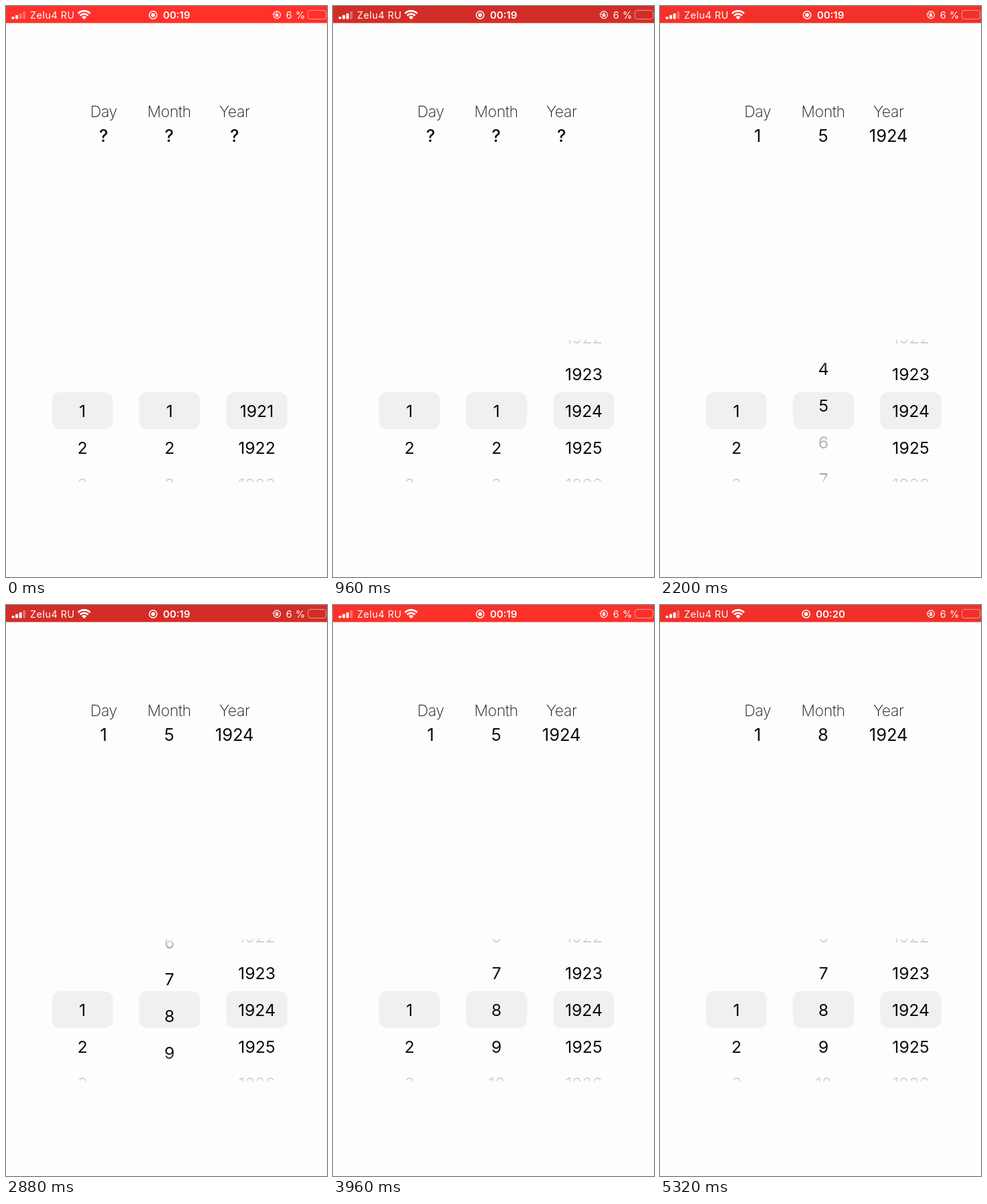
An HTML page for the animation above (5360 ms loop, 480 px wide and 853 px high).

```html
<!DOCTYPE html>
<html lang="en">
<head>
<meta charset="utf-8">
<title>Date wheels</title>
<style>
  html, body { margin: 0; width: 100%; height: 100%; overflow: hidden; background: #fefdfe; }
  svg { display: block; width: 480px; height: 853px; font-family: Inter, "Noto Sans", sans-serif; }
  .mid { text-anchor: middle; }
  .title { font-size: 23px; font-weight: 200; letter-spacing: -.4px; fill: #111; }
  .value { font-size: 25.5px; fill: #0b090c; }
  .row { font-size: 24.8px; fill: #0b090c; }
  .bar { font-size: 14.5px; fill: #fff; }
</style>
</head>
<body>
<svg viewBox="0 0 480 853">
  <defs>
    <linearGradient id="edges" gradientUnits="userSpaceOnUse" x1="0" y1="498" x2="0" y2="712">
      <stop offset="0" stop-color="#fff" stop-opacity=".08"/>
      <stop offset=".21" stop-color="#fff"/>
      <stop offset=".79" stop-color="#fff"/>
      <stop offset="1" stop-color="#fff" stop-opacity=".08"/>
    </linearGradient>
    <mask id="view" maskUnits="userSpaceOnUse" x="0" y="498" width="480" height="214" style="mask-type:alpha">
      <rect y="498" width="480" height="214" fill="url(#edges)"/>
    </mask>
    <clipPath id="fan"><path d="M116.800 20.300L104 7.500V0H129.600V7.500Z"/></clipPath>
  </defs>

  <rect id="status" width="480" height="25.500"/>
  <g id="signal" fill="#fff"></g>
  <text class="bar" x="36" y="18.500" letter-spacing=".45">Zelu4 RU</text>
  <g clip-path="url(#fan)" fill="none" stroke="#fff" stroke-width="2.700">
    <circle cx="116.800" cy="20" r="12.600"/>
    <circle cx="116.800" cy="20" r="8.200"/>
    <circle cx="116.800" cy="20" r="2.500" stroke-width="5"/>
  </g>
  <g id="record">
    <circle cx="220" cy="13.500" r="5.700" fill="none" stroke="#fff" stroke-width="1.500"/>
    <circle cx="220" cy="13.500" r="2.900" fill="#fff"/>
  </g>
  <text id="clock" class="bar mid" x="255" y="18.800" style="font-size:15px;font-weight:600"></text>
  <g fill="none" stroke="#fff" stroke-width="1.200">
    <path d="M400.200 11.300A5.300 5.300 0 1 1 400 14.500M398.700 11.500L400 13.300L402 12"/>
    <path d="M403.900 13V11.800a1.200 1.200 0 0 1 2.400 0V13"/>
    <rect x="402.900" y="12.700" width="4.400" height="3.400" rx=".7" fill="#fff" stroke="none"/>
  </g>
  <text class="bar" x="418.800" y="18.500" letter-spacing=".6">6 %</text>
  <rect x="451.500" y="6.500" width="27" height="13" rx="3.600" fill="none" stroke="#fff" stroke-opacity=".5"/>

  <g id="labels"></g>
  <g id="cards" fill="#f2eff2"></g>
  <g id="wheels" mask="url(#view)"></g>
</svg>
<script>
const LOOP = 5360, ROW = 55, MIDDLE = 605, FADE = 150;
const $ = id => document.getElementById(id);
const clamp = (v, lo, hi) => Math.min(hi, Math.max(lo, v));

function add(parent, tag, attrs, text = '') {
  const el = document.createElementNS('http://www.w3.org/2000/svg', tag);
  for (const key in attrs) el.setAttribute(key, attrs[key]);
  el.textContent = text;
  return parent.appendChild(el);
}

// A swipe is an accelerating drag, then a decaying glide to rest.
function swipe(t, { start, release, from, drag, to, decay }) {
  if (t < release) return from + drag * clamp((t - start) / (release - start), 0, 1) ** 2;
  return to - (to - from - drag) * Math.exp((release - t) / decay);
}

const firstSwipe = { start: 1220, release: 1440, from: 0, drag: 1.9, to: 4, decay: 140 };
const nextSwipe = { start: 2100, release: 2440, from: 4, drag: 1.6, to: 7, decay: 203 };
const monthPos = t => swipe(t, t < nextSwipe.start ? firstSwipe : nextSwipe);

// Dragged a little past a row, then snapped back onto it.
function yearPos(t) {
  const u = clamp((t - 80) / 330, 0, 1);
  if (t < 500) return 3.27 * u * u * (3 - 2 * u);
  return 3 + .27 * Math.exp(-(((t - 500) / 150) ** 2));
}

const columns = [
  { title: 'Day', labelX: 146, x: 114.3, first: 1, count: 31, pos: () => 0,
    values: [[0, '?'], [1100, '1']] },
  { title: 'Month', labelX: 244, x: 244.5, first: 1, count: 12, pos: monthPos,
    press: { row: 5, down: 2060, up: 2250 },
    values: [[0, '?'], [1100, '1'], [2060, '5'], [4200, '8']] },
  { title: 'Year', labelX: 341.7, x: 375, first: 1921, count: 12, pos: yearPos,
    values: [[0, '?'], [1100, '1924']] }
];

for (const c of columns) {
  add($('labels'), 'text', { class: 'title mid', x: c.labelX, y: 166 }, c.title);
  c.value = add($('labels'), 'text', { class: 'value mid', x: c.labelX, y: 202.5 });
  add($('cards'), 'rect', { x: c.x - 45.6, y: 577, width: 91.3, height: 55, rx: 12 });
  c.rows = Array.from({ length: c.count }, (_, i) =>
    add($('wheels'), 'text', { class: 'row mid', x: c.x }, c.first + i));
}

const signal = [3.5, 6, 8.5, 11.5].map((h, i) =>
  add($('signal'), 'rect', { x: 8.5 + i * 5.6, y: 19.5 - h, width: 4, height: h, rx: 1 }));

// A touched row dims under the finger.
function rowOpacity(press, i, t) {
  if (!press || press.row !== i) return 1;
  const dim = Math.min((t - press.down) / FADE, 1 - (t - press.up) / FADE);
  return 1 - .75 * clamp(dim, 0, 1);
}

function drawColumn(c, t) {
  const pos = c.pos(t);
  c.rows.forEach((row, i) => {
    const gap = i - pos;
    row.style.display = Math.abs(gap) < 2.4 ? '' : 'none';
    row.setAttribute('y', MIDDLE + gap * ROW + 9);
    row.setAttribute('opacity', rowOpacity(c.press, i, t));
  });
  const text = c.values.filter(v => v[0] <= t).pop()[1];
  c.value.textContent = text;
  c.value.style.fontWeight = text === '?' ? 500 : 400;
}

function draw(t) {
  columns.forEach(c => drawColumn(c, t));

  const glow = .5 + .5 * Math.cos((t + 60) / 1920 * 2 * Math.PI);
  $('status').setAttribute('fill', `rgb(${211 + 44 * glow},${45 + 4 * glow},${39 + 3 * glow})`);

  const bars = t < 240 ? 2 : 3;
  signal.forEach((bar, i) => bar.setAttribute('opacity', i < bars ? 1 : .3));

  const late = t >= 4800;
  $('clock').textContent = late ? '00:20' : '00:19';
  $('record').setAttribute('transform', `translate(${late ? -1.5 : 0})`);
}

const start = performance.now();
function tick() {
  draw((performance.now() - start) % LOOP);
  requestAnimationFrame(tick);
}
draw(0);
requestAnimationFrame(tick);
</script>
</body>
</html>
```
